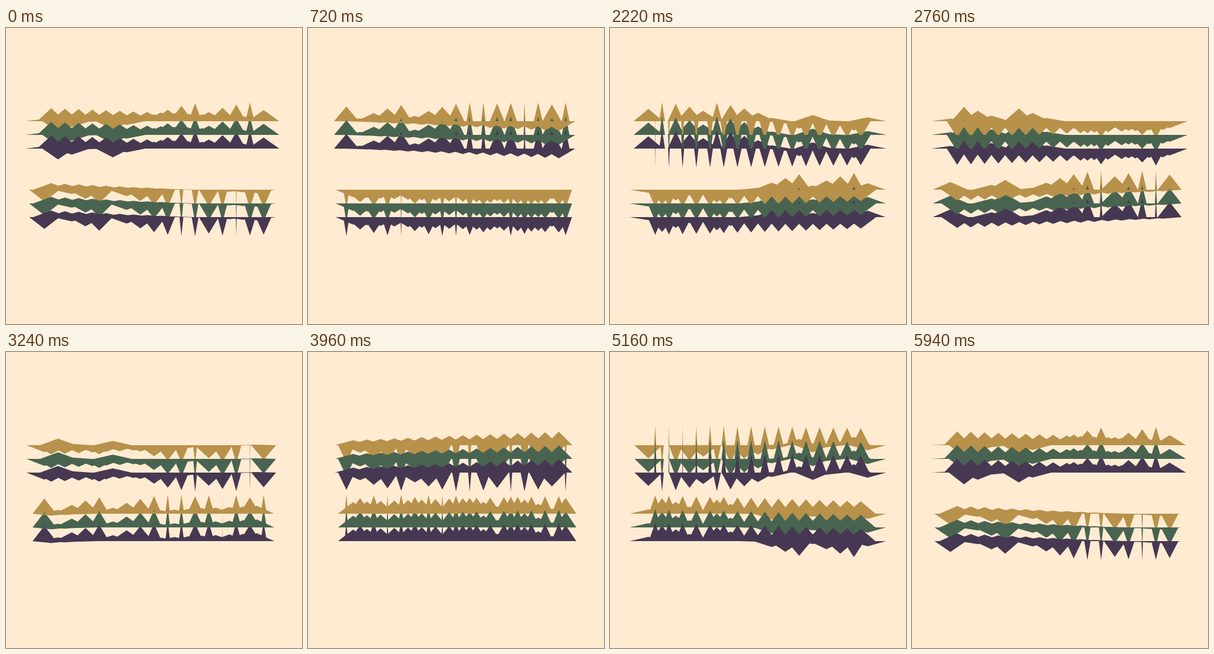
Animation, 540 px wide and 540 px high, one loop 6 s. Source, as an HTML page with a canvas:

```html
<!DOCTYPE html>
<html lang="en">
<head>
<meta charset="utf-8">
<title>Turning triangles</title>
<style>
  html, body { margin: 0; width: 100%; height: 100%; overflow: hidden; background: #ffebd2; }
  canvas { display: block; width: 540px; height: 540px; }
</style>
</head>
<body>
<canvas id="stage" width="540" height="540"></canvas>
<script>
const ctx = document.getElementById('stage').getContext('2d');
const SIZE = 540, LOOP = 6000, STEP = 60;
const RADIUS = 35, GAP = 25, CENTER = 270;
const COLORS = ['#b8914b', '#486450', '#463852'];
const WRAP = 180 / Math.PI;

// Phases in degrees at the middle column of each layer.
const BANDS = [
  { y: 170, back: 21, front: 152.3 },
  { y: 295, back: 232, front: 175 }
];

// The back layer's delay wraps at one radian, symmetric about the middle.
const backDelay = d => (d * 16.1) % WRAP;
const frontDelay = d => d * 2;

function triangle(x, y, degrees) {
  const a = degrees * Math.PI / 180;
  const half = RADIUS * Math.cos(a);
  ctx.moveTo(x - half, y);
  ctx.lineTo(x, y - RADIUS * Math.sin(a));
  ctx.lineTo(x + half, y);
  ctx.closePath();
}

function layer(y, reach, phase, delay) {
  COLORS.forEach((color, row) => {
    ctx.fillStyle = color;
    for (let d = -reach; d <= reach; d++) {
      ctx.beginPath();
      triangle(CENTER + d * GAP, y + row * GAP, phase + delay(d));
      ctx.fill();
    }
  });
}

function draw(ms) {
  const turn = Math.floor((ms % LOOP) / STEP) * STEP / LOOP * 360;
  ctx.fillStyle = '#ffebd2';
  ctx.fillRect(0, 0, SIZE, SIZE);
  for (const { y, back, front } of BANDS) {
    layer(y, 8, back + turn, backDelay);
    layer(y, 7.5, front + turn, frontDelay);
  }
}

let start;
function tick(now) {
  start ??= now;
  draw(now - start);
  requestAnimationFrame(tick);
}
draw(0);
requestAnimationFrame(tick);
</script>
</body>
</html>
```
